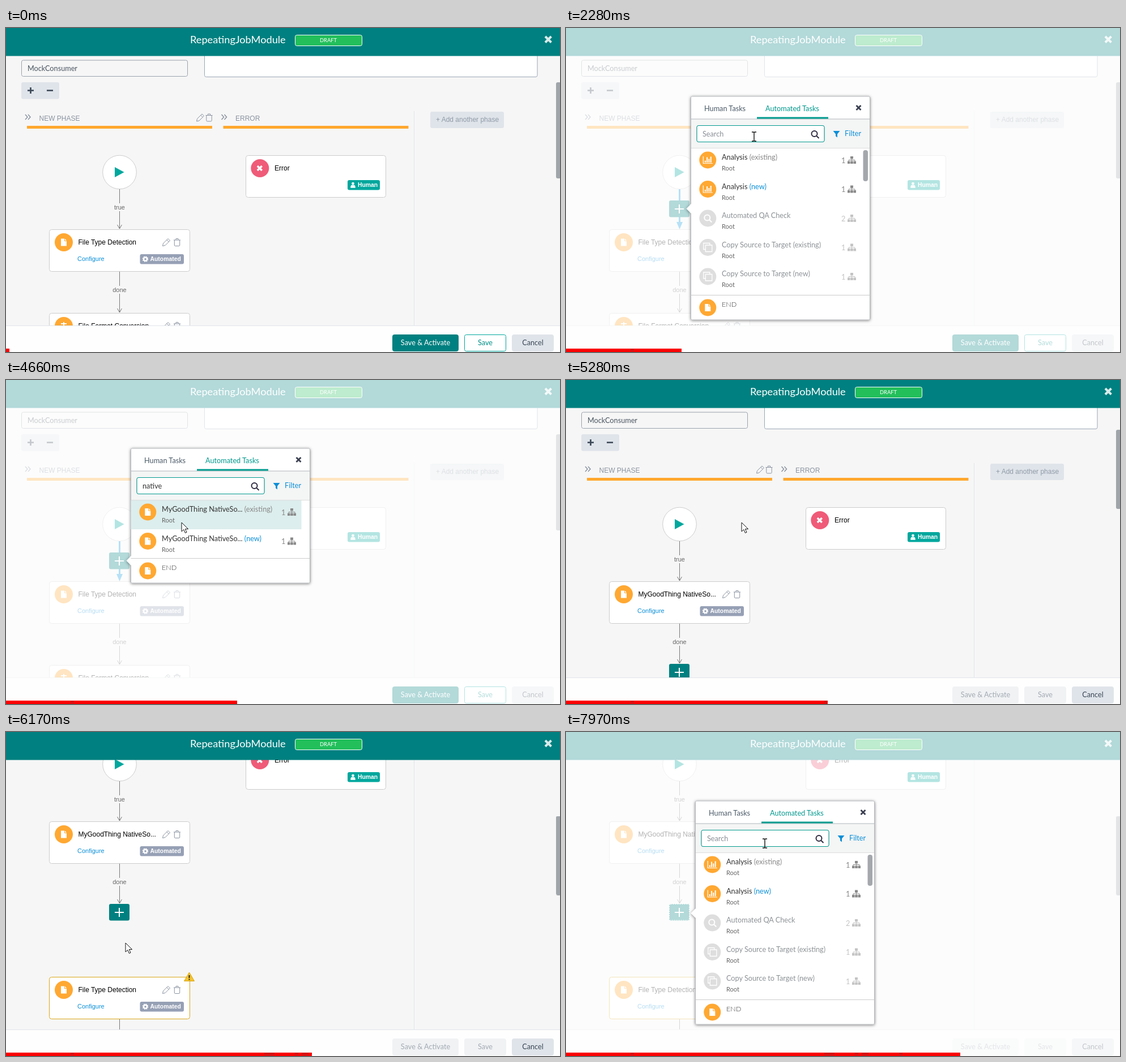
An HTML page that plays this animation: 978 by 573 pixels, repeating every 8 s.

```html
<!DOCTYPE html>
<html lang="en">
<head>
<meta charset="utf-8">
<title>Workflow editor</title>
<style>
html, body { margin: 0; width: 100%; height: 100%; overflow: hidden; background: #f6f6f6; }
svg { display: block; width: 100%; height: 100%; }
text { font: 12px "Liberation Sans", Arial, sans-serif; white-space: pre; }
.ui { font: 12.7px Lato, sans-serif; }
.title { font: 18.2px Lato, sans-serif; }
.draft { font: 9.4px Lato, sans-serif; }
.root { font: 11px Lato, sans-serif; }
.end { font: 300 12.5px Lato, sans-serif; }
.small { font-size: 11px; }
.badge { font-size: 10.4px; font-weight: bold; }
.mid { text-anchor: middle; }
.line { fill: none; stroke: currentColor; }

/* Hard switches */
.sw { animation: 8s step-end infinite; }
.before { animation-name: before; }
.after { animation-name: after; }
.plain { animation-name: plain; }
.hot { animation-name: hot; }
.popA { animation-name: popA; }
.popB { animation-name: popB; }
.focusA { animation-name: focusA; }
.focusB { animation-name: focusB; }
.hintA { animation-name: hintA; }
.allA { animation-name: allA; }
.foundA { animation-name: foundA; }
.caretA { animation-name: caretA; }
.caretB { animation-name: caretB; }
.pickA { animation-name: pickA; }
.overOne { animation-name: overOne; }
.overTwo { animation-name: overTwo; }
.arrow { animation-name: arrow; }
.beam { animation-name: beam; }
.key { fill-opacity: 0; animation: key 8s step-end infinite; }
@keyframes before { 0% { opacity: 1 } 62.5%, to { opacity: 0 } }
@keyframes after { 0% { opacity: 0 } 62.5%, to { opacity: 1 } }
@keyframes plain { 0% { opacity: 1 } 11.5%, to { opacity: 0 } }
@keyframes hot { 0% { opacity: 0 } 11.5%, to { opacity: 1 } }
@keyframes popA { 0% { opacity: 0 } 14.3% { opacity: 1 } 62.5%, to { opacity: 0 } }
@keyframes popB { 0% { opacity: 0 } 85.8%, to { opacity: 1 } }
@keyframes focusA { 0% { opacity: 0 } 20.8%, to { opacity: 1 } }
@keyframes focusB { 0% { opacity: 0 } 92.5%, to { opacity: 1 } }
@keyframes hintA { 0% { opacity: 1 } 41.25%, to { opacity: 0 } }
@keyframes allA { 0% { opacity: 1 } 50%, to { opacity: 0 } }
@keyframes foundA { 0% { opacity: 0 } 50%, to { opacity: 1 } }
@keyframes pickA { 0% { opacity: 0 } 56.6%, to { opacity: 1 } }
@keyframes overTwo { 0% { opacity: 0 } 86.6% { opacity: 1 } 88.4%, to { opacity: 0 } }
@keyframes overOne { 0% { opacity: 0 } 88.4% { opacity: 1 } 89.4%, to { opacity: 0 } }
@keyframes arrow { 0% { opacity: 1 } 19.5% { opacity: 0 } 55.6% { opacity: 1 } 90%, to { opacity: 0 } }
@keyframes beam { 0% { opacity: 0 } 19.5% { opacity: 1 } 55.6% { opacity: 0 } 90%, to { opacity: 1 } }
@keyframes key { 0% { fill-opacity: 0 } 41.25% { fill-opacity: 1 } 70%, to { fill-opacity: 0 } }
@keyframes caretA {
  0%, 27.4%, 40.6% { opacity: 0 }
  20.8%, 34% { opacity: 1; transform: none }
  41.25% { opacity: 1; transform: translateX(7px) }
  42.5% { opacity: 1; transform: translateX(13px) }
  43.75% { opacity: 1; transform: translateX(18px) }
  45% { opacity: 1; transform: translateX(21px) }
  46.25% { opacity: 1; transform: translateX(28px) }
  47.5% { opacity: 1; transform: translateX(35px) }
  54%, to { opacity: 0; transform: translateX(35px) }
}
@keyframes caretB { 0% { opacity: 0 } 92.5% { opacity: 1 } 98.6%, to { opacity: 0 } }

/* Continuous motion */
.veil { animation: veil 8s linear infinite; }
.page { animation: page 8s linear infinite; }
.thumb { animation: thumb 8s linear infinite; }
.cursor { animation: cursor 8s ease-in-out infinite; }
.bar { animation: bar 8s steps(116) -5ms infinite; }
@keyframes veil { 0%, 13.9% { opacity: 0 } 15.4%, 64.2% { opacity: .7 } 65.6%, 84.7% { opacity: 0 } 86.2%, to { opacity: .7 } }
@keyframes page { 0%, 74% { transform: none } 76.4%, to { transform: translateY(-198px) } }
@keyframes thumb { 0%, 74% { transform: none } 76.4%, to { transform: translateY(60.5px) } }
@keyframes bar { from { width: 6px } to { width: 702px } }
@keyframes cursor {
  0%, 2% { transform: translate(871px, 574px) }
  10.6%, 14.3% { transform: translate(204px, 316px) }
  16.3%, 17% { transform: translate(236px, 291px) }
  20.3%, 53.5% { transform: translate(332px, 192px) }
  57%, 66.5% { transform: translate(310px, 252px) }
  73.5%, 77.8% { transform: translate(211px, 373px) }
  82%, 85.6% { transform: translate(203px, 317px) }
  87.4% { transform: translate(324px, 264px) }
  92%, to { transform: translate(351px, 197px) }
}
</style>
</head>
<body>
<svg id="stage" viewBox="0 0 978 573">
  <defs>
    <path id="cross" class="line" d="M-4-4 4 4M4-4-4 4"/>
    <path id="pencil" class="line" d="M-6.5 6.5l1-4.5L3-6.5 6.5-3-2 5.5zM.8-4.3l3.5 3.5"/>
    <path id="trash" class="line" d="M-6-4H6M-4.7-4v9q0 1.5 1.5 1.5h6.4q1.5 0 1.5-1.5v-9M-2-4v-2.5h4V-4"/>
    <path id="file" fill="currentColor" d="M-5-6.5H1V-2H5V6.5H-5zM2-6.5 5-3H2z"/>
    <path id="swap" class="line" stroke-width="2" d="M-5-4H5M0-7v3M-4 1H4M0-4v9"/>
    <g id="gear" class="line"><circle r="2.9" stroke-width="2.4"/><circle r="4.4" stroke-width="1.8" stroke-dasharray="1.73"/></g>
    <path id="person" fill="currentColor" d="M-4.3 5q0-5 2.3-5h4q2.3 0 2.3 5zM-2.4-2.6a2.4 2.4 0 1 1 4.8 0a2.4 2.4 0 1 1-4.8 0"/>
    <g id="tree"><path fill="currentColor" d="M-2.5-6.5h5v4.5h-5zM-7.5 2h4.5v4.5h-4.5zM-2.3 2h4.6v4.5h-4.6zM3 2h4.5v4.5H3z"/><path class="line" d="M0-2v4M-5.5 2V0h11v2"/></g>
    <g id="chart" class="line"><path stroke-width="1.2" d="M-8-6.5V6H8.5"/><path stroke-width="2" d="M-4.5 4.5V1M-1.2 4.5V-5M2.1 4.5V-2M5.4 4.5V-6"/></g>
    <path id="loupe" class="line" stroke-width="2" d="M-6-1a5 5 0 1 1 10 0a5 5 0 1 1-10 0M2.7 2.7 7 7"/>
    <path id="copy" class="line" stroke-width="1.3" d="M-4 3.5h-3.5v-11h11V-4M-4-4H7.5V7.5H-4z"/>
    <filter id="shade" x="-10%" y="-10%" width="120%" height="120%"><feDropShadow dx="0" dy="1" stdDeviation="2.5" flood-opacity=".5"/></filter>
  </defs>
</svg>
<script>
const TEAL = '#008080', MINT = '#00a79d', ORANGE = '#ffa832', BLUE = '#0a8fd8', GREY = '#8a93a0';
const PALE = '#dfe4ea', INK = '#3a4654', FAINT = '#c4c4c4';

const text = (x, y, s, fill, cls = '') => `<text x="${x}" y="${y}" fill="${fill}" class="${cls}">${s}</text>`;
const box = (x, y, w, h, fill, stroke = 'none', r = 3, more = '') =>
  `<rect x="${x}" y="${y}" width="${w}" height="${h}" rx="${r}" fill="${fill}" stroke="${stroke}" ${more}/>`;
const disc = (x, y, r, fill) => `<circle cx="${x}" cy="${y}" r="${r}" fill="${fill}"/>`;
const icon = (name, x, y, color, more = '') =>
  `<g transform="translate(${x} ${y})" color="${color}" ${more}><use href="#${name}"/></g>`;
const line = (d, color, width = 1) => `<path d="${d}" fill="none" stroke="${color}" stroke-width="${width}"/>`;
const group = (cls, ...parts) => `<g class="${cls}">${parts.join('')}</g>`;
const at = (x, y, ...parts) => `<g transform="translate(${x} ${y})">${parts.join('')}</g>`;

const tools = (x, y, gap) => icon('pencil', x, y, GREY) + icon('trash', x + gap, y, GREY);
const badge = (x, y, w, fill, glyph, s) =>
  box(x, y, w, 17.5, fill) + icon(glyph, x + 9.5, y + 8.7, '#fff') + text(x + 18, y + 12.3, s, '#fff', 'badge');

const node = (y, title, glyph = 'file', border = '#ccc') => at(0, y,
  box(76.5, .5, 248, 74, '#fff', border, 4), disc(102, 23, 16, ORANGE), icon(glyph, 102, 23, '#fff'),
  text(127.5, 27, title, '#000'), tools(283, 23, 19),
  text(126, 56, 'Configure', BLUE, 'small'), badge(236.5, 44, 77.5, '#96a0b5', 'gear', 'Automated'));

const edge = (y, end, label) => line(`M200.5 ${y}V${end}M196.5 ${end - 7}l4 7l4-7`, '#777') +
  box(186, y + 25, 29, 14, '#f6f6f6', 'none', 0) + text(200.5, y + 36, label, '#666', 'small mid');

const addButton = y => box(182, y, 36, 29.5, TEAL) + line(`M192 ${y + 15}h16M200 ${y + 7}v16`, '#fff', 2);

const phase = (x, name) => line(`M${x} 153l4 4.5l-4 4.5m5-9l4 4.5l-4 4.5`, GREY, 1.5) +
  text(x + 24.5, 164, name, GREY) + box(x + 3, 173, 327, 5, '#ffa82e', 'none', 0);

const page = group('page',
  box(27.5, 57, 293, 28.5, '#f6f6f6', '#9aa3ae'), text(38, 76, 'MockConsumer', '#4a5560', 'ui'),
  box(350.5, 20, 587.5, 66.5, '#fff', '#9aa5b5'),
  box(27, 96, 67, 29.5, PALE), line('M38 110.5h11M43.5 105v11M72 110.5h11', INK, 2.6),
  phase(34, 'NEW PHASE'), phase(380.5, 'ERROR'), tools(343, 158.5, 15.5),
  line('M720.5 147V760', PALE), box(749, 148, 130, 29, PALE), text(759, 166, '+ Add another phase', '#909aa6'),
  box(423.5, 225.5, 247, 74, '#fff', '#ccc', 4), disc(448.3, 248, 16, '#ef5b78'),
  icon('cross', 447.8, 248, '#fff', 'stroke-width="3.4" transform-origin="0 0"'),
  text(474, 252, 'Error', '#000'), badge(603, 269, 57, MINT, 'person', 'Human'),
  '<circle cx="200.5" cy="255" r="29.8" fill="#fff" stroke="#ccc"/>',
  `<path d="M192 246v18l16.5-9z" fill="${MINT}"/>`,
  group('sw before',
    group('sw plain', edge(285, 355, 'true')),
    group('sw hot', line('M200.5 285V346', '#0a9be0', 3), '<path d="M195 343h11l-5.5 13z" fill="#0a9be0"/>', addButton(305)),
    node(356, 'File Type Detection'), edge(431, 503, 'done'), node(504, 'File Format Conversion', 'swap')),
  group('sw after',
    edge(285, 355, 'true'), node(356, 'MyGoodThing NativeSo...'), edge(431, 501, 'done').replaceAll('467', '467'),
    addButton(502),
    group('sw popB', box(182.5, 502.5, 35, 28.5, 'none', '#fff', 2, 'stroke-dasharray="2 2"')),
    node(631, 'File Type Detection', 'file', '#d9a514'),
    line('M200.5 706V760', '#777'),
    '<path d="M323.5 623l9 15.5h-18z" fill="#f4c430" stroke="#d9a514" stroke-linejoin="round"/>',
    line('M323.5 628v5m0 1.5v2', '#222', 2)));

const button = (x, w, s, fill, ink, stroke = fill) =>
  box(x + .5, 542.5, w - 1, 29, fill, stroke) + text(x + w / 2, 561, s, ink, 'ui mid');
const offFill = '#f0f2f4', offInk = '#a4abb3';

const chrome = box(0, 0, 978, 49.5, TEAL, 'none', 0) + text(325, 27, 'RepeatingJobModule', '#fff', 'title') +
  box(510.5, 12.5, 118, 19, '#22bf5b', '#fff') + text(569, 25, 'DRAFT', '#fff', 'draft mid') +
  line('M952 15l10.5 10.5m0-10.5L952 25.5', '#d9ebeb', 4) +
  box(0, 526.5, 978, 47, '#fefefe', 'none', 0) + line('M0 526.5H978', '#e0e4ea') +
  group('sw before', button(682, 117, 'Save &amp; Activate', TEAL, '#fff'), button(809, 74, 'Save', '#fff', '#009088', MINT),
    box(971, 96, 9, 170, '#a0a5ab')) +
  group('sw after', button(682, 117, 'Save &amp; Activate', offFill, offInk), button(809, 74, 'Save', offFill, offInk),
    group('thumb', box(971, 88, 9, 140, '#a0a5ab'))) +
  button(893, 74, 'Cancel', PALE, INK);

const row = (i, glyph, name, suffix, count, on = true) => {
  const hue = suffix === '(new)' ? BLUE : '#888';
  const title = on ? `${name} <tspan fill="${hue}">${suffix}</tspan>` : `${name} ${suffix}`;
  return at(0, 212 + 51.5 * i,
    disc(250.3, 21.5, 15, on ? ORANGE : '#dedede'), icon(glyph, 250.3, 21.5, '#fff'),
    text(275, 21, title, on ? '#333' : '#8d9296', 'ui'), text(275, 40, 'Root', '#666', 'root'),
    text(486, 26.5, count, on ? '#888' : FAINT, 'ui'), icon('tree', 504.5, 21.5, on ? '#8a8a8a' : FAINT));
};
const hover = (i, cls) => group('sw ' + cls, box(220.5, 212.5 + 51.5 * i, 301, 51.5, '#dceeed', 'none', 0));

const panel = (listHeight, rows) => {
  const end = 212 + listHeight;
  return `<g filter="url(#shade)">${box(220.5, 121, 316, end - 77, '#fff', '#b5b8bb', 2)}<path d="M221 311l-8.5 8.5 8.5 8.5z" fill="#fff"/></g>` +
    rows + line(`M220.5 ${end + .5}H536.5`, '#ccc') + disc(250.3, end + 22.5, 15, ORANGE) +
    icon('file', 250.3, end + 22.5, '#fff') + text(275, end + 21, 'END', '#333', 'end');
};

const allRows = row(0, 'chart', 'Analysis', '(existing)', 1) + row(1, 'chart', 'Analysis', '(new)', 1) +
  row(2, 'loupe', 'Automated QA Check', '', 2, false) + row(3, 'copy', 'Copy Source to Target', '(existing)', 1, false) +
  row(4, 'copy', 'Copy Source to Target', '(new)', 1, false) + box(524.5, 216, 8.5, 55, '#a4a8ad', 'none', 4);
const foundRows = hover(0, 'pickA') + row(0, 'file', 'MyGoodThing NativeSo...', '(existing)', 1) +
  row(1, 'file', 'MyGoodThing NativeSo...', '(new)', 1);

const popupTop = key =>
  text(244, 146.5, 'Human Tasks', '#4b5a68', 'ui') + text(352, 146.5, 'Automated Tasks', '#009a8e', 'ui') +
  icon('cross', 516.5, 141, '#3a3f50', 'stroke-width="2.8"') +
  box(221, 161, 315, 51, '#f4f5f5', 'none', 0) + line('M221 161H536', '#c8ccd0', 1.5) + line('M221 212.5H536', '#ddd') +
  line('M337 159H463', '#009a8e', 3) +
  box(231, 172.5, 225, 29, '#fff', '#8a98a8') + group('sw focus' + key, box(231, 172.5, 225, 29, '#fff', '#009a8e')) +
  group('sw hint' + key, text(241, 192, 'Search', '#8a8f96', 'ui')) +
  group('sw caret' + key, line('M241.5 180v15', '#222')) +
  icon('loupe', 439.5, 188, '#2e2b40') +
  `<path d="M471.5 182h12l-4.5 5.5v6l-3-2.2v-3.8z" fill="${BLUE}"/>` + text(492, 191, 'Filter', BLUE, 'ui');

const typed = [...'native'].map((c, i) => `<tspan class="key" style="animation-delay:${i * 100}ms">${c}</tspan>`).join('');
const popups =
  group('sw popA', group('sw allA', panel(260, allRows)), group('sw foundA', panel(103, foundRows)),
    popupTop('A'), text(241, 192, typed, '#333', 'ui')) +
  group('sw popB', at(8, 1, panel(260, hover(0, 'overOne') + hover(1, 'overTwo') + allRows), popupTop('B')));

const cursor = group('cursor',
  group('sw arrow', '<path d="M0 0v16l3.8-3.5 2.6 6 2.6-1.2-2.6-5.8h5.2z" fill="#fff" stroke="#111"/>'),
  group('sw beam', line('M-4-8h3l1 1 1-1h3M0-7V7M-4 8h3l1-1 1 1h3', '#111', 1.4)));

const shadows = [[114, 6], [456, 18], [510, 6], [522, 12], [588, 6]];
const progress = `<clipPath id="done"><rect class="bar" y="567" width="6" height="6"/></clipPath><g clip-path="url(#done)">` +
  box(0, 567, 702, 6, '#fa0000', 'none', 0) +
  shadows.map(([x, w]) => box(x, 567, w, 6, '#d80f0f', 'none', 0)).join('') + '</g>';

document.getElementById('stage').insertAdjacentHTML('beforeend',
  page + chrome + `<rect class="veil" width="978" height="573" fill="#fff"/>` + popups + progress + cursor);
</script>
</body>
</html>
```
